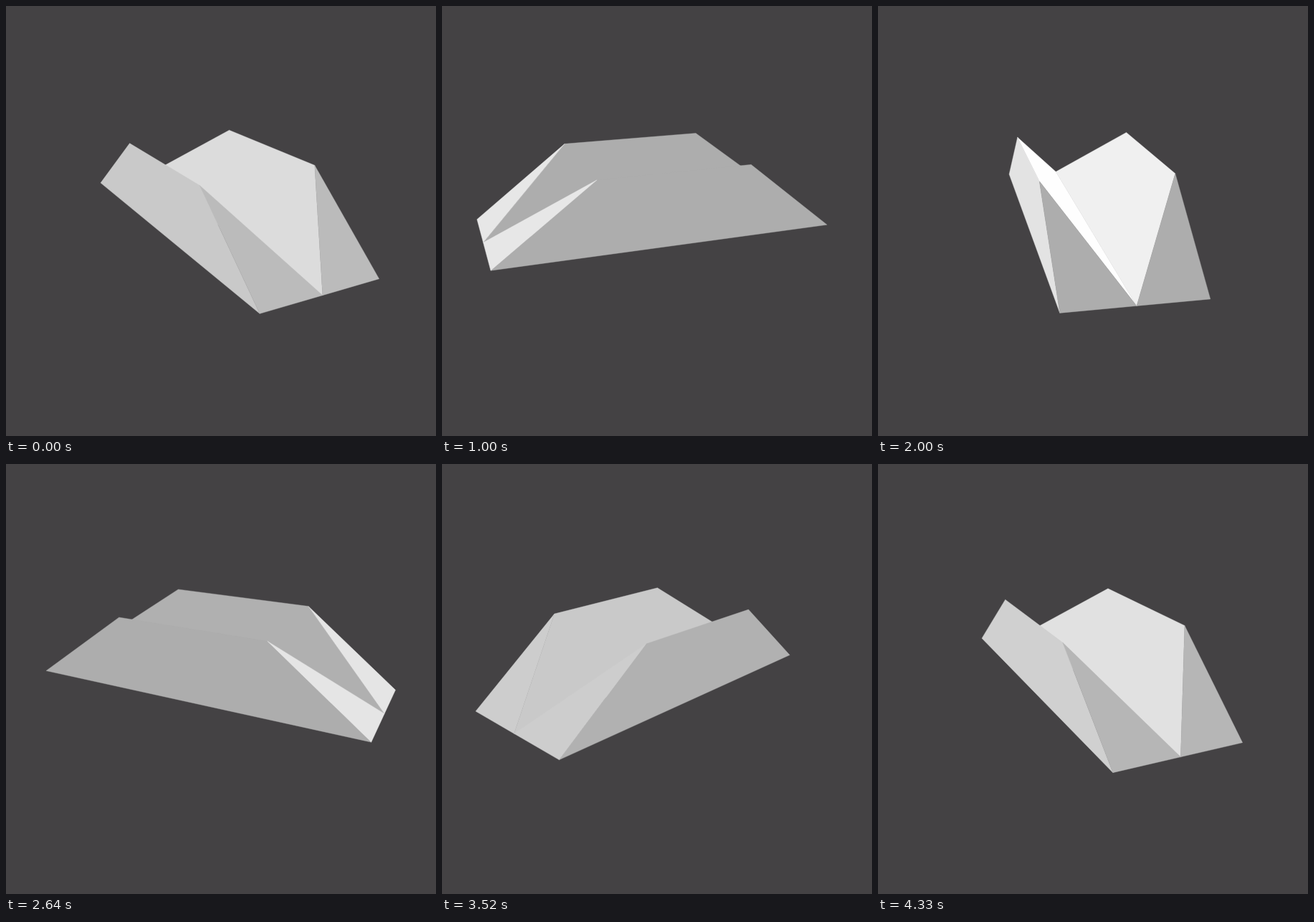
Write an HTML page with a canvas that moves like this. It is 600 px wide and 600 px high and loops after 4.36 s.

```html
<!DOCTYPE html>
<html lang="en">
<head>
<meta charset="utf-8">
<title>Rotating folded solid</title>
<style>
  html, body { margin: 0; width: 100%; height: 100%; overflow: hidden; background: #444244; }
  canvas { display: block; }
</style>
</head>
<body>
<canvas id="stage" width="600" height="600"></canvas>
<script>
const ctx = document.getElementById('stage').getContext('2d');
const LOOP = 4360, STEPS = 131;
const START_ANGLE = 62.75, STEP_ANGLE = 2.7535, START_LAG = 0.92;

// Solid, in units of the base corner radius
const BASE = { side: 0.3355, end: 0.942 };
const RIDGE = { side: 0.3385, end: 0.413, height: 0.405 };

// How far each kind of face runs outwards while it climbs to the ridge
const RUN = { wall: 0, slope: RIDGE.side, gable: BASE.end - RIDGE.end };

// Compass directions: 0 is right, 90 is towards the viewer
const AMBIENT = 173, OVERHEAD = 40;
const LIGHTS = [
  { direction: 226, power: 96 },
  { direction: -42, power: 115 }
];

const rad = degrees => degrees * Math.PI / 180;

// Perspective of a point at (x right, z towards viewer), on the ground or at ridge height
function project(x, z, raised) {
  const w = (raised ? 0.954 : 1) - 0.2703 * z;
  return [
    290.4 + (243.8 * x + 14.3 * z + (raised ? 3.3 : 0)) / w,
    301.4 + (94.5 * z - (raised ? 91 : 0)) / w
  ];
}

function area(points) {
  return points.reduce((sum, [x, y], i) => {
    const [nx, ny] = points[(i + 1) % points.length];
    return sum + x * ny - nx * y;
  }, 0);
}

function shade(kind, direction) {
  const length = Math.hypot(RUN[kind], RIDGE.height);
  const outward = RIDGE.height / length, upward = RUN[kind] / length;
  const light = LIGHTS.reduce((sum, { direction: from, power }) =>
    sum + Math.max(0, power * outward * Math.cos(rad(direction - from)) + OVERHEAD * upward), 0);
  return Math.min(254, Math.round(AMBIENT + light));
}

function face(kind, direction, points, winding) {
  if (area(points) * winding <= 0) return;
  const grey = shade(kind, direction);
  ctx.fillStyle = ctx.strokeStyle = `rgb(${grey},${grey},${grey})`;
  ctx.beginPath();
  points.forEach(p => ctx.lineTo(...p));
  ctx.closePath();
  ctx.fill();
  ctx.stroke();
}

function block(side, angle) {
  const sin = Math.sin(rad(angle)), cos = Math.cos(rad(angle));
  const edge = (u, v, raised) => [v, -v].map(end =>
    project(u * sin + end * cos, end * sin - u * cos, raised));
  const outer = edge(side * BASE.side, BASE.end, false);
  const valley = edge(0, BASE.end, false);
  const ridge = edge(side * RIDGE.side, RIDGE.end, true);

  face('wall', angle - 90 * side, [outer[0], outer[1], ridge[1], ridge[0]], -side);
  face('slope', angle + 90 * side, [valley[0], valley[1], ridge[1], ridge[0]], side);
  face('gable', angle, [outer[0], valley[0], ridge[0]], side);
  face('gable', angle + 180, [outer[1], valley[1], ridge[1]], -side);
}

function draw(time) {
  const step = Math.floor(time % LOOP * STEPS / LOOP);
  const angle = START_ANGLE - STEP_ANGLE * Math.max(0, step - START_LAG);
  const far = Math.cos(rad(angle)) > 0 ? 1 : -1;
  ctx.fillStyle = '#444244';
  ctx.fillRect(0, 0, 600, 600);
  ctx.lineWidth = 0.4;
  ctx.lineJoin = 'round';
  block(far, angle);
  block(-far, angle);
}

const start = performance.now();
function tick() {
  draw(performance.now() - start);
  requestAnimationFrame(tick);
}
tick();
</script>
</body>
</html>
```
